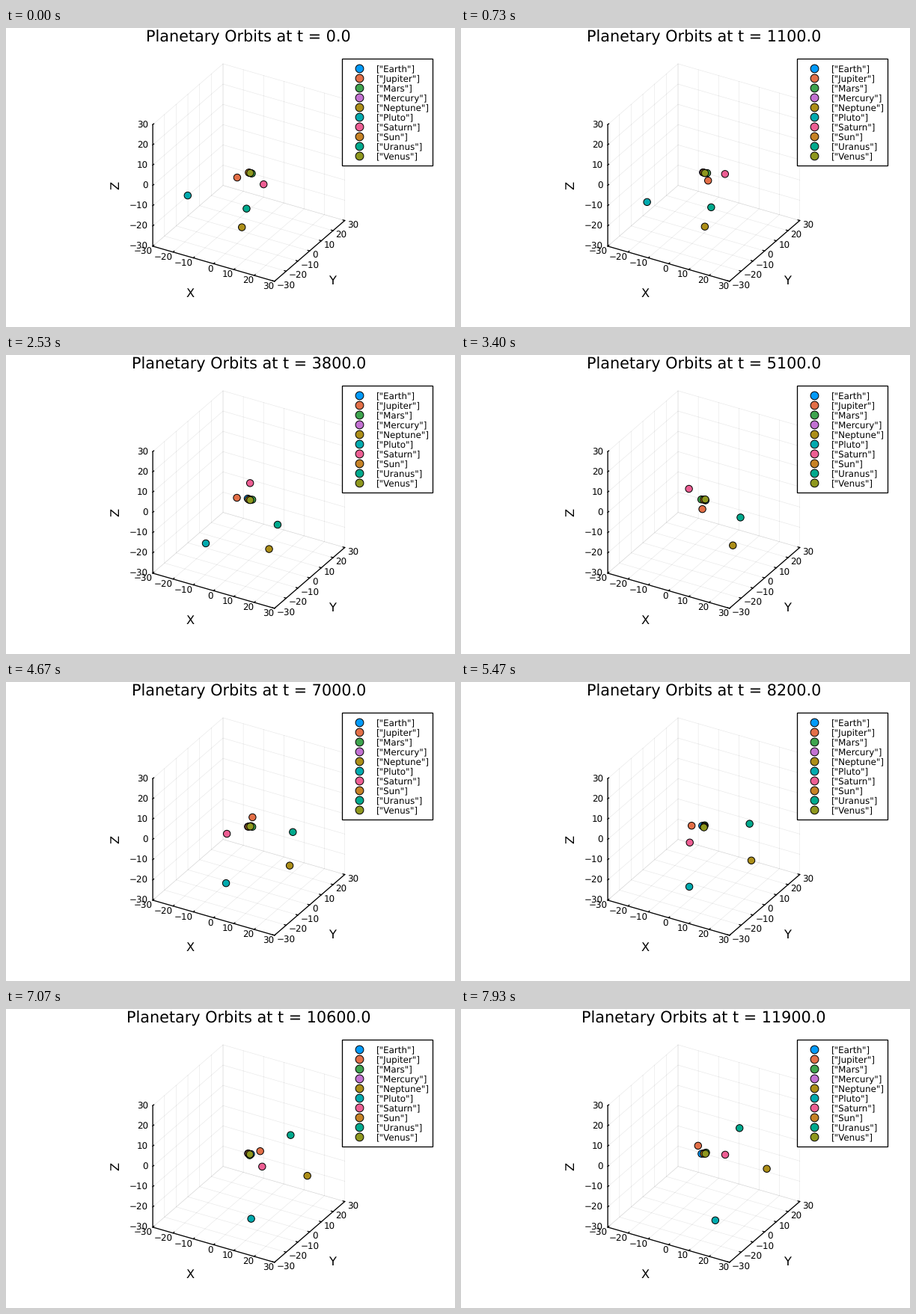
These frames come from a looping animation (600 px wide and 400 px high, 8 s). A matplotlib script:

```python
import numpy as np
import matplotlib.pyplot as plt
from matplotlib.animation import FuncAnimation
from matplotlib.patches import Circle, Rectangle

W, H, DPI = 600, 400, 100
STATES, LOOP = 120, 8000
SUB = 3             # drawn frames per state, for finer timing
DAYS = 100          # days per state
STEPS = 200         # integration steps per state
GM = 2.95912208286e-4
L = 30              # axis limit in AU

COLORS = {
    "Earth": "#009afa", "Jupiter": "#e36f47", "Mars": "#3ea44e",
    "Mercury": "#c371d2", "Neptune": "#ac8e18", "Pluto": "#00aaae",
    "Saturn": "#ed5e93", "Sun": "#c68225", "Uranus": "#00a98d",
    "Venus": "#8e971e",
}
# Inner planets start on the x axis and move along y: distance, speed.
INNER = {"Mercury": (0.387, 27.65), "Venus": (0.723, 17.38),
         "Earth": (1, 17.2), "Mars": (1.524, 12.6)}
# Outer planets: position in AU, velocity in AU per 1000 days.
OUTER = {
    "Jupiter": ((-3.5024, -3.8170, -1.5508), (5.6543, -4.1249, -1.9059)),
    "Saturn": ((9.0755, -3.0458, -1.6484), (1.6832, 4.8353, 1.9246)),
    "Uranus": ((8.3101, -16.2901, -7.2521), (3.5418, 1.3710, 0.5503)),
    "Neptune": ((11.4708, -25.7295, -10.8169), (2.8893, 1.1453, 0.3968)),
    "Pluto": ((-15.5387, -25.2226, -3.1902), (2.7673, -1.7070, -1.3650)),
}
MASS = {"Sun": 1, "Jupiter": 9.548e-4, "Saturn": 2.856e-4}


def start(name):
    if name in INNER:
        r, v = INNER[name]
        return (r, 0, 0), (0, v, 0)
    return OUTER.get(name, ((0, 0, 0), (0, 0, 0)))


def simulate():
    """Leapfrog integration, one row of positions per state."""
    gm = GM * np.array([MASS.get(n, 0) for n in COLORS])
    pos, vel = np.array([start(n) for n in COLORS], float).swapaxes(0, 1).copy()
    vel /= 1000
    dt = DAYS / STEPS
    eye = np.eye(len(COLORS))

    def accel():
        d = pos[None] - pos[:, None]
        r2 = np.einsum("ijk,ijk->ij", d, d) + eye
        return np.einsum("ij,ijk->ik", gm / (r2 * np.sqrt(r2)), d)

    rows = [pos.copy()]
    acc = accel()
    for _ in range(STATES - 1):
        for _ in range(STEPS):
            vel += acc * (dt / 2)
            pos += vel * dt
            acc = accel()
            vel += acc * (dt / 2)
        rows.append(pos.copy())
    return np.array(rows)


def project(p):
    """Orthographic view from azimuth 30, elevation 30, in stage pixels."""
    x, y, z = np.moveaxis(np.asarray(p, float), -1, 0)
    c = np.sqrt(3) / 2
    sx = 324.4 + 3.13 * (c * x + 0.5 * y)
    sy = 193.4 - 3.13 * (c / 2 * y - 0.25 * x + c * z)
    return np.stack([sx, sy], -1)


orbits = simulate()
spots = project(orbits)
inside = (np.abs(orbits) <= L).all(axis=-1)

plt.rcParams["font.family"] = "DejaVu Sans"
plt.rcParams["text.hinting"] = "no_hinting"
fig = plt.figure(figsize=(W / DPI, H / DPI), dpi=DPI, facecolor="white")
ax = fig.add_axes([0, 0, 1, 1])
ax.set_xlim(0, W)
ax.set_ylim(H, 0)
ax.axis("off")

PX = 72 / DPI
TICK, GUIDE, TITLE = 11.86, 16.3, 20.75


def text(x, y, s, size, ha="center", va="baseline", **kw):
    return ax.text(x, y, s, fontsize=size * PX, ha=ha, va=va, **kw)


def line(points, width=1.3, **kw):
    xy = project(points)
    ax.plot(xy[:, 0], xy[:, 1], color="black", lw=width * PX, **kw)


def grid(*points):
    line(points, 0.65, alpha=0.09, zorder=1)


def dot(x, y, r, color, z):
    return ax.add_patch(Circle((x, y), r, fc=color, ec="black", lw=PX, zorder=z))


def tick(v, at, inward, dx, dy, ha):
    """Short inward mark and its number."""
    at = np.array(at)
    line([at, at + 0.9 * np.array(inward)], zorder=2)
    x, y = project(at)
    text(x + dx, y + dy, str(v).replace("-", "\u2212"), TICK, ha)


for v in range(-L, L + 1, 10):
    grid((v, -L, -L), (v, L, -L), (v, L, L))
    grid((L, v, -L), (-L, v, -L), (-L, v, L))
    grid((-L, -L, v), (-L, L, v), (L, L, v))
    tick(v, (v, -L, -L), (0, 1, 0), -0.4, 11, "right")
    tick(v, (L, v, -L), (-1, 0, 0), 3.3, 9.8, "left")
    tick(v, (-L, -L, v), (0, 1, 0), -6, 4.4, "right")

line([(-L, -L, L), (-L, -L, -L), (L, -L, -L), (L, L, -L)],
     zorder=2, solid_joinstyle="miter")

text(246, 360, "X", GUIDE)
text(435.8, 343.3, "Y", GUIDE)
text(147, 210, "Z", GUIDE, va="center", rotation=90)
title = text(324.2, 18.8, "", TITLE)

ax.add_patch(Rectangle((448.7, 41.4), 121.6, 142.6, fc="white", ec="black",
                       lw=1.3 * PX, zorder=20))
dots = []
for i, (name, color) in enumerate(COLORS.items()):
    y = 54.4 + 13 * i
    dot(472.5, y, 5.4, color, 21)
    text(494.6, y + 4.3, f'["{name}"]', TICK, "left", zorder=21)
    dots.append(dot(*spots[0, i], 4.7, color, 5 + 0.1 * i))


def draw(n):
    k = min((n + 1) // SUB, STATES - 1)
    title.set_text(f"Planetary Orbits at t = {k * DAYS:.1f}")
    for d, xy, seen in zip(dots, spots[k], inside[k]):
        d.center = tuple(xy)
        d.set_visible(bool(seen))
    return [title, *dots]


anim = FuncAnimation(fig, draw, frames=STATES * SUB, interval=LOOP / (STATES * SUB),
                     repeat=True, repeat_delay=0, blit=False)
plt.show()
```
